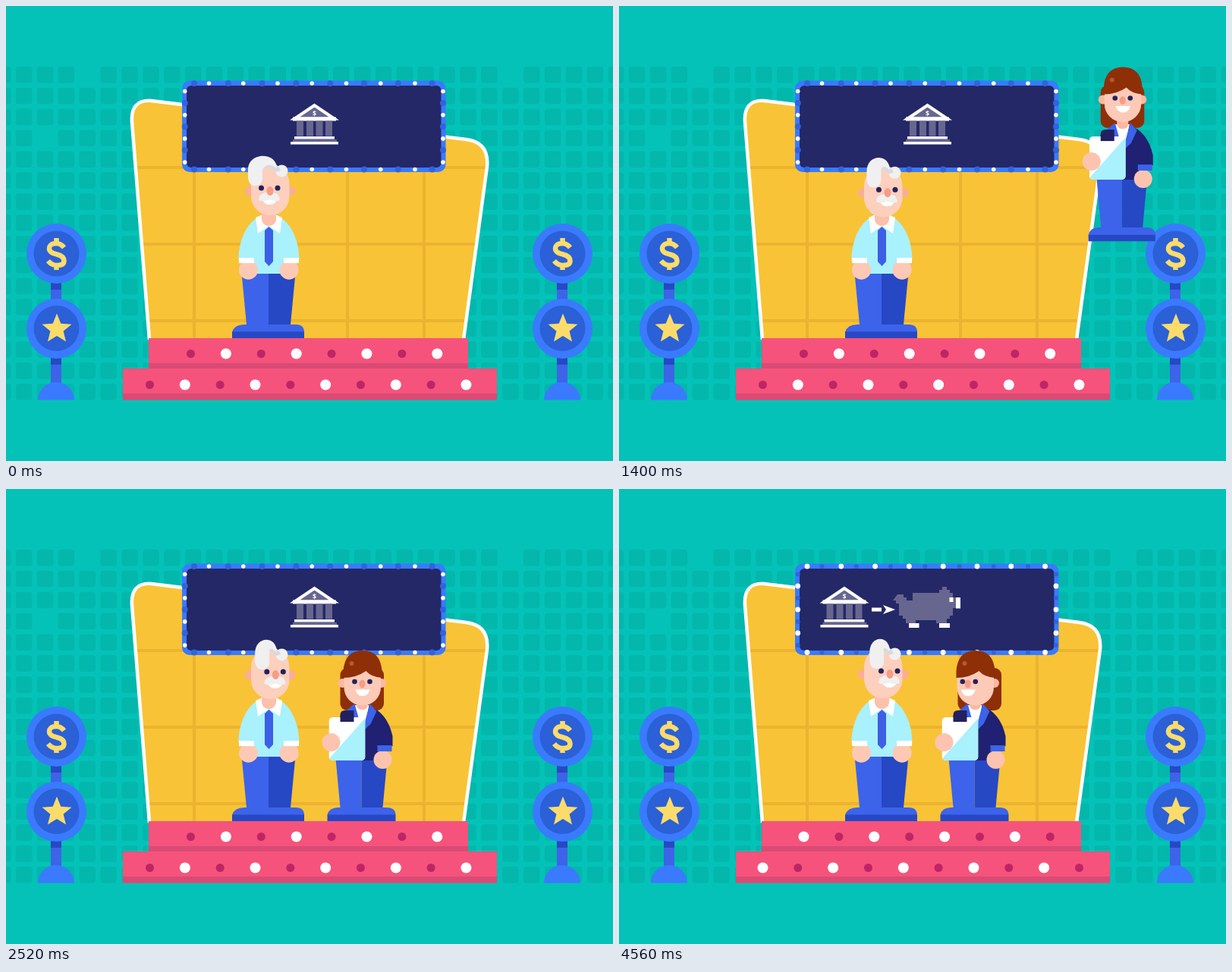
These frames come from a looping animation (800 px wide and 600 px high, 4.6 s). An HTML page:

```html
<!DOCTYPE html>
<html lang="en">
<head>
<meta charset="utf-8">
<title>Game show stage</title>
<style>
  html, body { margin: 0; width: 100%; height: 100%; overflow: hidden; background: #04c2b7; }
  svg { display: block; width: 100%; height: 100%; }
</style>
</head>
<body>
<svg viewBox="0 0 800 600">
  <defs>
    <clipPath id="wall"><path d="M189 440 166 153Q164 123 192 125L607 176Q637 180 634 212L603 440Z"/></clipPath>
    <clipPath id="board"><rect x="426" y="301" width="48" height="57" rx="5"/></clipPath>
    <g id="stand">
      <path fill="#3d63e8" d="M59 360h14v140h-14z"/>
      <path fill="#2748c4" d="M59 364h14v10h-14zM59 462h14v11h-14z"/>
      <path fill="#3a7afe" d="M42 519.500a24 23.500 0 0 1 48 0z"/>
      <g fill="#3a7afe"><circle cx="66.500" cy="326.500" r="39.500"/><circle cx="66.500" cy="425.500" r="39.500"/></g>
      <g fill="#2b60d6"><circle cx="66.500" cy="326.500" r="30"/><circle cx="66.500" cy="425" r="30"/></g>
      <path fill="none" stroke="#fbdc6b" stroke-width="6.500" d="M76.500 318.500Q72 313 66.500 313C59 313 57 317 57 319.500C57 325 62 326 67 327.500C73 329 76.500 331 76.500 336C76.500 340 73 342 67 342Q60 342 55.500 336M66.500 306v7M66.500 341v7"/>
      <path id="star" fill="#fbdc6b"/>
    </g>
  </defs>

  <g id="grid" fill="#03b7ac"></g>

  <g clip-path="url(#wall)">
    <path fill="#f8c336" d="M150 100h500v340H150z"/>
    <path stroke="#ebb330" stroke-width="4" d="M150 213h500M150 314h500M150 415h500M248 213v230M349 213v230M450 213v230M551 213v230"/>
  </g>
  <path fill="none" stroke="#fff" stroke-width="4.500" d="M189 440 166 153Q164 123 192 125L607 176Q637 180 634 212L603 440"/>

  <rect x="232" y="98.500" width="347.500" height="120.500" rx="10" fill="#3a7afe"/>
  <rect x="238" y="105" width="335.500" height="108" rx="6" fill="#242866"/>
  <g id="boardDots"></g>

  <g id="bank">
    <path fill="#67668f" stroke="#fff" stroke-width="4" d="M380.500 148.500 406.500 131 432.500 148.500z"/>
    <path fill="#fff" d="M378 146.500h57v5h-57zM380 172h53v3.500h-53zM375 179h63v3.500h-63z"/>
    <path fill="#67668f" d="M383 151.500h9v20h-9zM396 151.500h9v20h-9zM408.500 151.500h9v20h-9zM421 151.500h9v20h-9zM378 176h58v3h-58z"/>
    <text x="406.500" y="144.500" text-anchor="middle" font-family="Open Sans, sans-serif" font-weight="700" font-size="9" fill="#fff">$</text>
  </g>
  <g id="pig">
    <path fill="#67668f" d="M368 139h8v4h4v4h8v-10h35v-4h4v-4h6v4h4v4h4v6h4v14h-4v10h-4v4h-4v6h-14v-4h-27v4h-13v-6h-4v-4h-5v-16h-4v-4h-4z"/>
    <path fill="#fff" d="M383 177h13.500v6H383zM423 177h14v6h-14zM436.500 143h5v6h-5zM445 143h6v14.500h-6z"/>
  </g>
  <path id="arrow" fill="#fff" d="M333 156.500h13v5h-13zM348 153 364 159 348 165 352 159z"/>

  <path fill="#f5537c" d="M188 438h421v40h38v41.500H154V478h34z"/>
  <path fill="#d94b74" d="M188 471h421v7H188zM154 511h493v8.500H154z"/>
  <g id="stepDots"></g>

  <use href="#stand"/>
  <use href="#stand" x="667"/>

  <g id="man">
    <g id="manBase">
      <path fill="#3c63ea" d="M298 430Q301 420 314 420H382Q393 420 393 430z"/>
      <path fill="#2748c4" d="M298 429.500h95v8.500h-95z"/>
    </g>
    <path fill="#3c63ea" d="M310.500 352H346v68h-29z"/>
    <path fill="#2748c4" d="M346 352h35.500L375 420h-29z"/>
    <g id="manTop">
      <g id="handL"><circle cx="319.500" cy="348" r="12.500" fill="#fdc9b5"/></g>
      <g id="handR"><circle cx="373" cy="348" r="12.500" fill="#fdc9b5"/></g>
      <path id="shirt" fill="#a9f1fd"/>
      <g id="handL2"><circle cx="319.500" cy="348" r="12.500" fill="#fdc9b5"/><path fill="#fff" d="M307 332h20v7h-20z"/></g>
      <g id="handR2"><circle cx="373" cy="348" r="12.500" fill="#fdc9b5"/><path fill="#fff" d="M366 332h20v7h-20z"/></g>
      <path fill="#fff" d="M329 279 338 275H355L364 279 361 300 346.500 290 332 300z"/>
      <path fill="#fdc0aa" d="M337 270h19v12q-2 8-9.500 8t-9.500-8z"/>
      <path fill="#3c5fe6" d="M346.500 291 352 296V337L346.500 343 341 337V296z"/>
    </g>
    <g id="manHead">
      <g fill="#f9ad9a"><circle cx="321" cy="244" r="6"/><circle cx="375.500" cy="244" r="6"/></g>
      <rect x="323" y="209" width="50.500" height="67" rx="25" fill="#fdcfbd"/>
      <circle cx="363.500" cy="217.500" r="8" fill="#f0f0f0"/>
      <path fill="#d9dadc" d="M336 216q2-9 12-9t14 10l-6 2-8-6z"/>
      <path id="tuft" fill="#f0f0f0"/>
      <g id="manFace">
        <g fill="#23225c"><circle cx="336.500" cy="240" r="3.500"/><circle cx="358" cy="240" r="3.500"/></g>
        <path fill="#fff" d="M338 255H357Q355 262 347.500 262T338 255"/>
        <path fill="#f0f0f0" d="M347.500 247Q353 245 358 248Q361 252 361 256Q354 259 347.500 255Q340 259 333 256Q333 249 339 247Q343 245 347.500 247"/>
        <ellipse cx="348" cy="244" rx="4.500" ry="6" fill="#f69c87"/>
      </g>
    </g>
  </g>

  <g id="woman">
    <g id="wBase">
      <path fill="#3c63ea" d="M424 430Q426 420 438 420H502Q514 420 514 430z"/>
      <path fill="#2748c4" d="M424 429.500h90v8.500h-90z"/>
      <path fill="#3c63ea" d="M435 356h34v64h-28z"/>
      <path fill="#2748c4" d="M469 356h34L497 420h-28z"/>
    </g>
    <g id="wTop">
      <g id="wHairBack"><rect x="441" y="236" width="57.500" height="56" rx="9" fill="#8e2f08"/></g>
      <path id="jacket" fill="#202172"/>
      <g id="wArm">
        <circle cx="497" cy="357" r="12" fill="#fcc4b0"/>
        <path fill="#3c63ea" d="M490 338h19v8h-19z"/>
      </g>
      <path fill="#fff" d="M459 285H479L474 314H464z"/>
      <path fill="#fcb8a2" d="M462.500 276h15v9q-1 6-7.500 6t-7.500-6z"/>
      <path fill="#3c63ea" d="M449 292 460 283 466 305 458 308zM480 283 489 293 481 310 470 320z"/>
      <path fill="#23205f" d="M441 298q0-6 6-6h12v10h-18z"/>
      <g clip-path="url(#board)">
        <path fill="#fff" d="M426 301h48v57h-48z"/>
        <path fill="#a9f1fd" d="M474 302v56h-48v-2z"/>
      </g>
      <path fill="#23205f" d="M441 299h18v8h-18z"/>
      <circle cx="429" cy="334" r="12" fill="#fcc4b0"/>
      <g id="wHead">
        <circle id="earL" cx="444" cy="256" r="6" fill="#fcb8a2"/>
        <circle cx="495.500" cy="256" r="6" fill="#fcb8a2"/>
        <rect x="446" y="222" width="48.500" height="63.500" rx="24" fill="#fdcab8"/>
        <path fill="#8e2f08" d="M445 249V240Q447 213 470.500 213T496 240V249Q482 248 475 240Q462 249 445 249"/>
        <circle cx="456" cy="230" r="3" fill="#b9572f"/>
        <g id="wFace">
          <circle id="eyeL" cx="460" cy="254" r="3.300" fill="#23225c"/>
          <circle cx="480" cy="254" r="3.300" fill="#23225c"/>
          <ellipse cx="470" cy="257" rx="4" ry="5.500" fill="#f69c87"/>
          <path fill="#fff" d="M461 264.500H480Q478 273 470.500 273T461 264.500"/>
        </g>
      </g>
    </g>
  </g>
</svg>
<script>
const LOOP = 4600;
const $ = id => document.getElementById(id);
const set = (id, name, value) => $(id).setAttribute(name, value);
const move = (id, value) => set(id, 'transform', value);
const about = (x, y, op) => `translate(${x} ${y}) ${op} translate(${-x} ${-y})`;
const clamp = v => Math.max(0, Math.min(1, v));
const smooth = v => v * v * (3 - 2 * v);
const linear = v => v;

// Keys are [time, value, easing into this key].
function track(t, keys) {
  let i = keys.findIndex(k => k[0] > t);
  if (i < 0) return keys[keys.length - 1][1];
  if (i === 0) return keys[0][1];
  const [t0, v0] = keys[i - 1], [t1, v1, ease = smooth] = keys[i];
  return v0 + (v1 - v0) * ease((t - t0) / (t1 - t0));
}

function buildGrid() {
  const holes = ['0,4', '0,24', '3,2'];
  let out = '';
  for (let r = 0; r < 16; r++)
    for (let c = 0; c < 30; c++)
      if (!holes.includes(r + ',' + c))
        out += `<rect x="${-15 + c * 27.88}" y="${80 + r * 27.87}" width="21.500" height="21.500" rx="4"/>`;
  $('grid').innerHTML = out;
}

function buildDots() {
  const dots = (list, r) => list.map(([x, y]) => `<circle cx="${x}" cy="${y}" r="${r}"/>`).join('');
  const pair = (cls, list, dark, rDark, rLit) =>
    `<g class="${cls}Off" fill="${dark}">${dots(list, rDark)}</g><g class="${cls}" fill="#fff">${dots(list, rLit)}</g>`;
  const steps = [[], []], frame = [[], []];
  for (let k = 0; k < 10; k++) {
    if (k < 8) steps[k % 2].push([243.5 + 46.4 * k, 458.5]);
    steps[k % 2].push([189.5 + 46.33 * k, 499.5]);
  }
  for (const y of [102, 215.5]) {
    for (let k = 0; k < 8; k++) frame[0].push([248 + 44.8 * k, y]);
    for (let k = 0; k < 7; k++) frame[1].push([267.5 + 45.25 * k, y]);
  }
  for (const x of [235.7, 576]) {
    for (let k = 0; k < 3; k++) frame[0].push([x, 128 + 31 * k]);
    for (let k = 0; k < 4; k++) frame[1].push([x, 112.5 + 31.2 * k]);
  }
  $('stepDots').innerHTML = pair('even', steps[0], '#be2566', 5.5, 7) + pair('odd', steps[1], '#be2566', 5.5, 7);
  $('boardDots').innerHTML = pair('even', frame[0], '#3263dc', 4, 3.4) + pair('odd', frame[1], '#3263dc', 3, 2.8);
}

function buildStar() {
  const points = Array.from({ length: 10 }, (_, i) => {
    const r = i % 2 ? 9 : 20.5, a = i * Math.PI / 5;
    return [67 + r * Math.sin(a), 426 - r * Math.cos(a)];
  });
  set('star', 'd', 'M' + points.join('L') + 'z');
}

function drawLights(t) {
  const n = Math.floor((t - 240) / 620);
  const fade = smooth(clamp((t - 240 - n * 620) / 100));
  const even = n < 0 ? 0 : n % 2 ? 1 - fade : fade;
  const opacity = { even, evenOff: 1 - even, odd: 1 - even, oddOff: even };
  for (const cls in opacity)
    document.querySelectorAll('.' + cls).forEach(g => g.setAttribute('opacity', opacity[cls]));
}

function drawIcons(t) {
  move('bank', `translate(${track(t, [[3380, 0], [3720, -97], [4120, -97], [4360, -109.5]])} 0)`);
  const pop = track(t, [[3440, 0], [3640, 1.1], [3760, 1]]);
  move('pig', `translate(${track(t, [[4120, 0], [4360, -1]])} 0) ` + about(410, 158, `scale(${pop})`));
  move('arrow', about(348, 159, `scale(${track(t, [[4160, 0], [4320, 1.1], [4400, 1]])})`));
}

function drawMan(t) {
  const s = track(t, [[3520, 0], [3760, 1], [3820, 1], [4060, 0]]);
  const nod = track(t, [[0, 0], [400, 0], [800, 2.5], [2000, 2], [3000, 0], [3520, 0], [3760, 9], [3820, 9], [4060, 0]]);
  const yaw = track(t, [[160, 0], [600, 5], [960, 5.5], [2000, 6.7], [3080, 8], [4560, 9]]);
  move('manBase', about(346, 438, `scale(${1 + .02 * s} 1)`));
  move('manTop', `translate(0 ${2 * s})`);
  move('manHead', `translate(0 ${nod})`);
  move('manFace', `translate(${yaw} 0)`);
  for (const [id, x, dir] of [['handL', 317, -1], ['handR', 376, 1]])
    for (const part of [id, id + '2'])
      move(part, `translate(${6 * dir * s} ${-s}) ` + about(x, 330, `rotate(${-10 * dir * s})`));
  const l = 306.5 - 5 * s, r = 386.5 + 5 * s;
  set('shirt', 'd', `M${l} 335C${l} 306 ${320 - 2 * s} 281 337 277H356C${373 + 2 * s} 281 ${r} 306 ${r} 335L${r - 4} 340 381.5 353H310.500L${l + 4} 340Z`);
  const h = 319 + 1.25 * yaw;
  set('tuft', 'd', `M${h} 216C${h} 192 357 192 357 214Q346 205 ${h + 19} 215V228Q${h + 18} 237 ${h + 9.5} 237T${h} 227Z`);
}

function drawWoman(t) {
  const outCubic = v => 1 - (1 - v) ** 3;
  const x = track(t, [[140, 880], [560, 742, linear], [640, 738], [1140, 738], [1400, 663, linear], [1680, 599, linear], [1900, 468.5, v => v ** 1.3]]);
  const y = track(t, [[140, 500], [300, 470, outCubic], [500, 532, v => v * v], [1140, 532], [1660, 279, outCubic], [1900, 438, v => v * v]]);
  const s = track(t, [[480, -.4], [580, 1], [720, 0], [820, 0], [960, 1], [1090, 1.6], [1200, -1], [1400, -.4], [1880, -.4], [1960, 1.3], [2000, 1], [2160, -.3], [2300, 0]]);
  const lean = track(t, [[820, 0], [960, 1], [1140, 1], [1240, 0], [1880, 0], [1960, 3.8], [2000, 3.6], [2180, -1], [2340, 0]]);
  const arm = track(t, [[1880, 0], [1980, 1], [2020, 1], [2240, 0]]);
  const turn = track(t, [[3340, 0], [3600, 1]]);
  move('woman', `translate(${x - 469} ${y - 438})`);
  move('wBase', about(469, 438, `scale(${1 + .05 * s} ${1 - .03 * s})`));
  move('wTop', `translate(0 ${3 * s}) ` + about(469, 400, `rotate(${lean})`));
  move('wHead', `translate(0 ${9 * s})`);
  move('wHairBack', `translate(${6 * turn} ${6 * s})`);
  move('wFace', `translate(${-9.7 * turn} 0)`);
  set('eyeL', 'cx', 460 + 3 * turn);
  set('earL', 'opacity', 1 - turn);
  move('wArm', `translate(${10 * arm} 0) ` + about(500, 335, `rotate(${-20 * arm})`));
  const e = 510 + 10 * arm;
  set('jacket', 'd', `M437 358V312Q442 292 462 286H478Q${503 + 3 * arm} 294 ${e} 326V339L${490 + 9 * arm} 344 502.500 ${354 - 4 * arm}V358Z`);
}

buildGrid();
buildDots();
buildStar();
const start = performance.now();
function frame() {
  const t = (performance.now() - start) % LOOP;
  drawLights(t);
  drawIcons(t);
  drawMan(t);
  drawWoman(t);
  requestAnimationFrame(frame);
}
frame();
</script>
</body>
</html>
```
